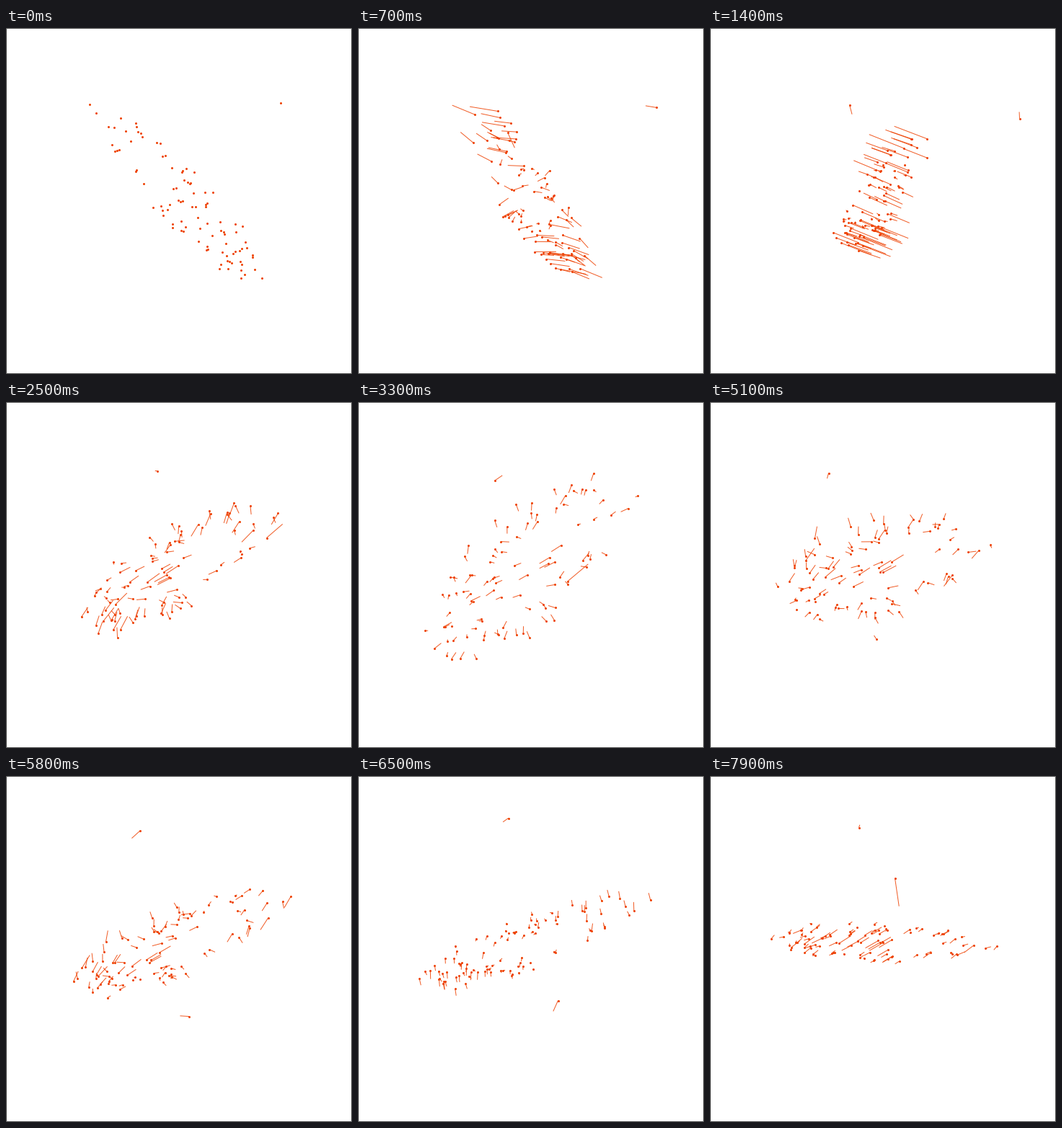
Write a matplotlib script that moves like this. It is 480x480 px and loops after 8 s.

```python
import numpy as np
import matplotlib.pyplot as plt
from matplotlib.animation import FuncAnimation
from matplotlib.collections import LineCollection
from matplotlib.patches import Rectangle

SIZE, DPI = 480, 100
FRAMES, STEP = 80, 100
LAG = 3                      # each tail reaches this many frames back
PX = 72 / DPI
ORANGE = "#ee4000"
CENTER = np.array([237, 232])


def smooth(u):
    u = np.clip(u, 0, 1)
    return u * u * (3 - 2 * u)


def axes(t):
    """Screen directions of the cloud's three axes at t seconds."""
    swing = 34 * np.sin(np.pi * t / 2.6)
    main = (-72 + 150 * smooth(t / 2.4) + 2 * t,
            -61 + 6.6 * t + 16 * np.sin(2.17 * (t - 1.05)))
    depth = (8 - 24 * np.exp(-2 * t),
             16 + 44 * np.exp(-((t - 3.9) / 1.5) ** 2))
    return np.array([main, depth, (0.86 * swing, -0.5 * swing)])


def cloud(count, seed):
    """A hollow ball of points, seen through the turning axes."""
    rng = np.random.default_rng(seed)
    ball = rng.normal(size=(count, 3))
    ball *= (rng.uniform(1.1, 1.8, count) / np.linalg.norm(ball, axis=1))[:, None]
    t = np.arange(FRAMES) * STEP / 1000
    return CENTER + np.einsum("nk,kct->tnc", ball, axes(t))


def glide(*keys):
    """Smooth path of one point through (frame, x, y) keys."""
    keys = np.array(keys, float)
    times, pos = keys[:, 0], keys[:, 1:]
    vel = np.gradient(pos, times, axis=0)
    f = np.arange(FRAMES)
    a = np.clip(np.searchsorted(times, f, "right") - 1, 0, len(times) - 2)
    b = a + 1
    span = (times[b] - times[a])[:, None]
    s = (f - times[a])[:, None] / span
    return ((1 + 2 * s) * (1 - s) ** 2 * pos[a] + s ** 2 * (3 - 2 * s) * pos[b]
            + span * s * (1 - s) * ((1 - s) * vel[a] - s * vel[b]))


strays = [
    glide((0, 229, 193), (14, 193, 106), (25, 209, 95), (41, 166, 119),
          (51, 164, 98), (65, 208, 58), (79, 206, 71)),
    glide((0, 380, 103), (14, 429, 125), (25, 361, 188), (41, 234, 301),
          (51, 230, 328), (65, 277, 311), (79, 256, 141)),
]
points = np.concatenate([cloud(95, 7), np.stack(strays, axis=1)], axis=1) + 0.5

fig = plt.figure(figsize=(SIZE / DPI, SIZE / DPI), dpi=DPI, facecolor="white")
ax = fig.add_axes([0, 0, 1, 1])
ax.set(xlim=(0, SIZE), ylim=(SIZE, 0))
ax.axis("off")
ax.add_patch(Rectangle((0.5, 0.5), SIZE - 1, SIZE - 1, fill=False,
                       ec="#444444", lw=PX, snap=False))
tails = ax.add_collection(LineCollection([], colors=ORANGE, linewidths=PX,
                                         alpha=0.85))
dots, = ax.plot([], [], "o", color=ORANGE, ms=3 * PX, mew=0, zorder=3)


def update(i):
    now, past = points[i], points[max(0, i - LAG)]
    tails.set_segments(np.stack([past, now], axis=1) if i else [])
    dots.set_data(now[:, 0], now[:, 1])
    return tails, dots


anim = FuncAnimation(fig, update, frames=FRAMES, interval=STEP,
                     repeat=True, repeat_delay=0)
plt.show()
```
